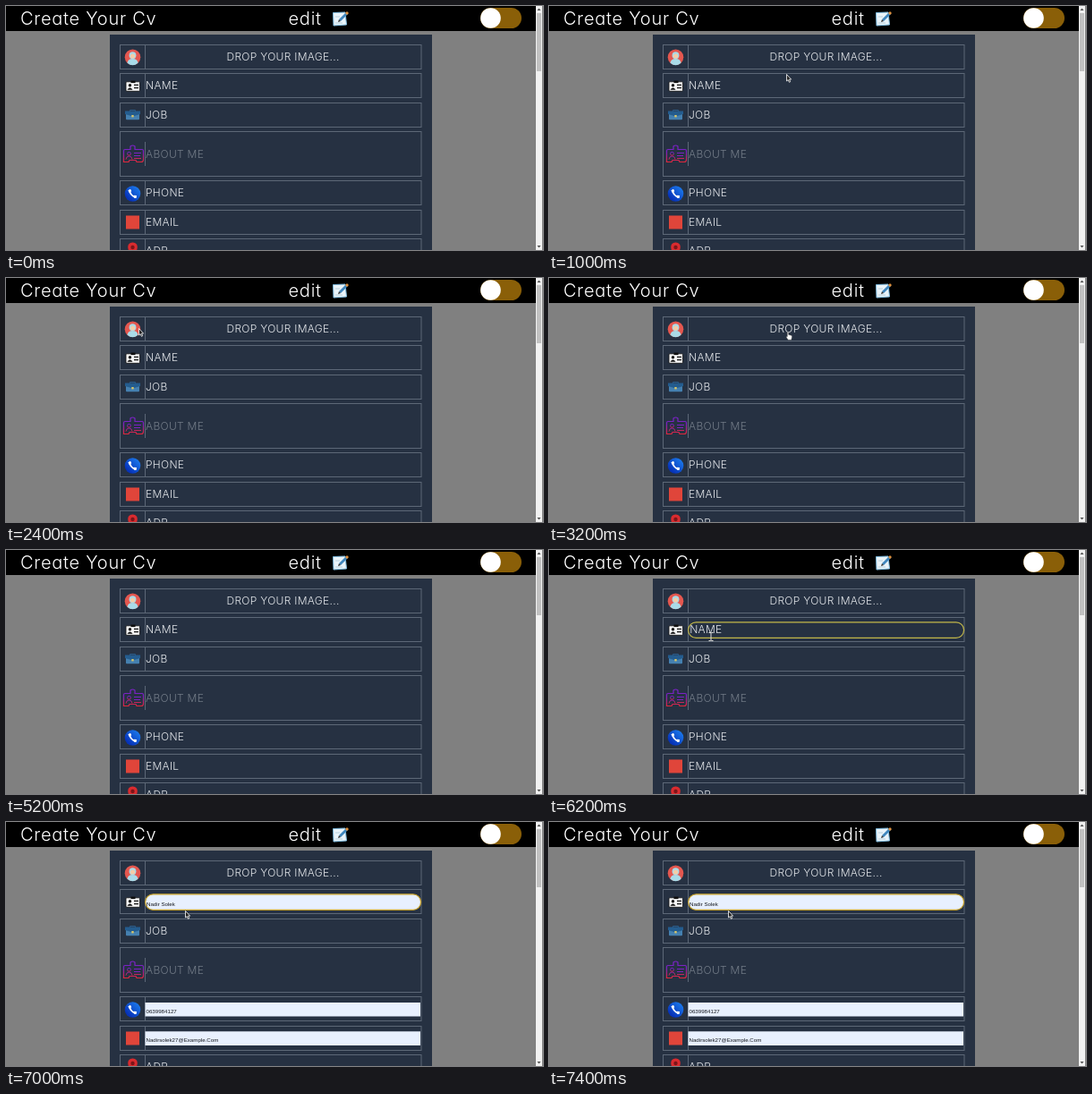
An HTML page that plays this animation: 600x273 px, repeating every 8 s.

```html
<!DOCTYPE html>
<html lang="en">
<head>
<meta charset="utf-8">
<title>Create Your Cv</title>
<style>
  html, body { margin: 0; height: 100%; overflow: hidden; background: #808080; }
  svg { display: block; width: 600px; height: 273px; }
  text { font-family: Inter, sans-serif; font-weight: 300; font-feature-settings: "cv11"; fill: #e4e7eb; }
  .head { font-size: 20px; letter-spacing: .75px; fill: #fff; }
  .label { font-size: 12px; letter-spacing: .3px; }
  .value { font: 6.17px "Liberation Sans", Arial, sans-serif; fill: #15181d; }
  .row { fill: none; stroke: #5d6877; }
  .filled { fill: #e8f0fe; }
</style>
</head>
<body>
<svg viewBox="0 0 600 273">
  <defs>
    <path id="arrow" d="M.5 .5V8L2.2 6.6L3.4 9.3L4.7 8.7L3.5 6.1H5.6Z" fill="#222" stroke="#fff" stroke-width=".8"/>
    <path id="beam" d="M-2.5 -4.5H-.6L0 -4L.6 -4.5H2.5M0 -4V4M-2.5 4.5H-.6L0 4L.6 4.5H2.5" fill="none" stroke="#ddd"/>
    <path id="hand" d="M1.6 .8Q2.4 0 3 .9V3.6L6.2 4.5Q7 5 6.8 6.2L6.1 9.5H2.4L.3 6.2Q0 5.2 1.6 5.8Z" fill="#fff" stroke="#333" stroke-width=".4"/>
    <linearGradient id="blue" x1="0" y1="1" x2="1" y2="0">
      <stop offset=".2" stop-color="#0632b8"/>
      <stop offset="1" stop-color="#1f86f5"/>
    </linearGradient>
    <linearGradient id="badge" x1="0" y1="0" x2="0" y2="1">
      <stop offset=".4" stop-color="#7a22c4"/>
      <stop offset="1" stop-color="#e0283c"/>
    </linearGradient>
  </defs>

  <rect width="592" height="28" fill="#000"/>
  <text class="head" x="16" y="20.8">Create Your Cv</text>
  <text class="head" x="315.5" y="20.8">edit</text>
  <g>
    <path d="M365.5 7.5L379 7L380.5 21L366 22Z" fill="#eaf4fa" stroke="#7dbbe0"/>
    <path d="M368 12h5M368 19h8" stroke="#a9c6d6" stroke-width=".8"/>
    <path d="M373 16L381 8" stroke="#3f86bd" stroke-width="2.8"/>
    <path d="M380 9L382 7" stroke="#e0913f" stroke-width="2.8"/>
    <path d="M371 18L372 15L374 17Z" fill="#333"/>
  </g>
  <rect x="530" y="2" width="46" height="23" rx="11.5" fill="#8a5f08"/>
  <circle cx="541.5" cy="13.5" r="11.3" fill="#fff"/>

  <rect x="592" width="7" height="273" fill="#f1f1f1"/>
  <rect x="593" y="8" width="5" height="65" fill="#c1c1c1"/>
  <path d="M593.5 5L595.5 2.5L597.5 5Z" fill="#505050"/>
  <path d="M593.5 268L595.5 270.5L597.5 268Z" fill="#505050"/>

  <rect x="116" y="32" width="360" height="241" fill="#263142"/>
  <g id="rows"></g>

  <g id="icons">
    <circle cx="141.5" cy="57.3" r="8.8" fill="#e4574f"/>
    <path d="M135.5 63.7Q136 59 141.5 59T147.5 63.7Q141.5 69 135.5 63.7Z" fill="#a9dbe8"/>
    <circle cx="141.5" cy="55.2" r="3.9" fill="#a9dbe8"/>
    <circle cx="141.5" cy="56" r="2.6" fill="#f4cda9"/>

    <rect x="134" y="84.8" width="15.5" height="10.5" rx="1" fill="#f5f5f5" stroke="#111" stroke-width=".8"/>
    <rect x="139.5" y="83.5" width="5" height="2.6" fill="#111"/>
    <circle cx="138.5" cy="88.7" r="1.7" fill="#111"/>
    <path d="M135.5 93.8Q138.5 89.3 141.5 93.8ZM143 87.8h5v1.2h-5zM143 91h5v1.2h-5z" fill="#111"/>

    <path d="M138.5 118v-1.5h6v1.5" fill="none" stroke="#2b5a86"/>
    <rect x="134" y="118" width="15" height="9.3" rx="1" fill="#4580b0"/>
    <path d="M133 117.5H150V121L141.5 123.5L133 121Z" fill="#245c8e"/>
    <rect x="140.3" y="122" width="2.4" height="2.4" fill="#d8c66a"/>

    <g fill="none" stroke="url(#badge)">
      <path d="M133 160.5H139V157Q141.5 155 144 157V160.5H152Q153.5 160.5 153.5 162V172Q153.5 174.5 151 174.5H146L145 172.5H138L137 174.5H131.5V162Q131.5 160.5 133 160.5Z" stroke-width="1.2"/>
      <path d="M134 171.5Q134.5 168 137.5 168T141 171.5M143 164.5H151M143 167.5H150M143 170.5H151"/>
      <circle cx="137.5" cy="165.3" r="1.9"/>
    </g>

    <circle cx="141.5" cy="210" r="8.8" fill="url(#blue)"/>
    <path d="M138 206Q138.5 212 145 214" fill="none" stroke="#fff" stroke-width="1.8"/>
    <path d="M137.7 205.5L139 208M143 213.2L145.8 213.5" stroke="#fff" stroke-width="3"/>

    <rect x="134" y="234.5" width="15" height="15" fill="#e0453a"/>

    <path d="M141.5 282L136.8 273Q134.5 265 141.5 264.5Q148.5 265 146.2 273Z" fill="#d92b2f"/>
    <circle cx="141.5" cy="270" r="2.2" fill="#7c1519"/>
  </g>

  <g id="filled">
    <rect class="filled" x="155.5" y="202" width="307.5" height="15.5"/>
    <rect class="filled" x="155.5" y="234.3" width="307.5" height="15.7"/>
    <text class="value" x="156.5" y="213.7">0639984127</text>
    <text class="value" x="156.5" y="246.2">Nadirsolek27@Example.Com</text>
  </g>
  <rect id="ring" x="155.6" y="80.8" width="308" height="17.6" rx="8.8" stroke-width="1.2"/>
  <text id="name" class="value" x="157" y="93.7">Nadir Solek</text>
  <use id="cursor"/>
</svg>

<script>
const LOOP = 8000, FOCUS = 6200, AUTOFILL = 7000;
const $ = id => document.getElementById(id);

// label, top, height, text x
const rows = [
  ["DROP YOUR IMAGE...", 43.5, 27, 246.5],
  ["NAME", 75.5, 27, 156],
  ["JOB", 108.5, 27, 156],
  ["ABOUT ME", 140.5, 50, 156],
  ["PHONE", 195.5, 27, 156],
  ["EMAIL", 228.5, 27, 156],
  ["ADR", 260.5, 27, 156],
];
$("rows").innerHTML = rows.map(([label, top, height, x]) => {
  const mid = top + height / 2;
  const dim = label === "ABOUT ME" ? ' style="fill:#727b87"' : "";
  return `<rect class="row" x="127.5" y="${top}" width="336.5" height="${height}"/>
    <path class="row" d="M155.5 ${mid - 13.5}v27"/>
    <text class="label" id="${label}" x="${x}" y="${mid + 4.3}"${dim}>${label}</text>`;
}).join("");

// start time, shape, x, y
const pointer = [
  [0], [800, "arrow", 277, 88], [1000, "arrow", 265, 76], [1200, "arrow", 183, 52],
  [1400, "arrow", 157, 36], [1600, "arrow", 137, 28], [1800, "beam", 89, 19],
  [2000, "beam", 78, 18.5], [2200, "arrow", 68, 21], [2400, "arrow", 148, 56],
  [2600, "hand", 213, 60.5], [2800, "hand", 252.5, 62], [3000, "hand", 264, 59],
  [3200, "hand", 264.7, 59.8], [5200], [5600, "hand", 193.5, 61.5],
  [5800, "beam", 183, 117], [6000, "arrow", 180, 100], [6200, "beam", 181, 97],
  [6600, "beam", 194, 97], [6800, "arrow", 200, 99],
];

const show = (id, on) => $(id).style.display = on ? "" : "none";

function draw(t) {
  const focused = t >= FOCUS, filled = t >= AUTOFILL;
  show("ring", focused);
  show("filled", filled);
  show("name", filled);
  for (const label of ["NAME", "PHONE", "EMAIL"]) show(label, !filled);
  $("NAME").setAttribute("x", focused ? 157.2 : 156);
  $("ring").setAttribute("fill", filled ? "#e8f0fe" : "none");
  $("ring").setAttribute("stroke", filled ? "#c9a227" : "#c3b84a");

  const [, shape, x, y] = pointer.findLast(step => step[0] <= t);
  show("cursor", shape);
  if (shape) {
    $("cursor").setAttribute("href", "#" + shape);
    $("cursor").setAttribute("transform", `translate(${x} ${y})`);
  }
}

function tick() {
  draw(performance.now() % LOOP);
  requestAnimationFrame(tick);
}
tick();
</script>
</body>
</html>
```
